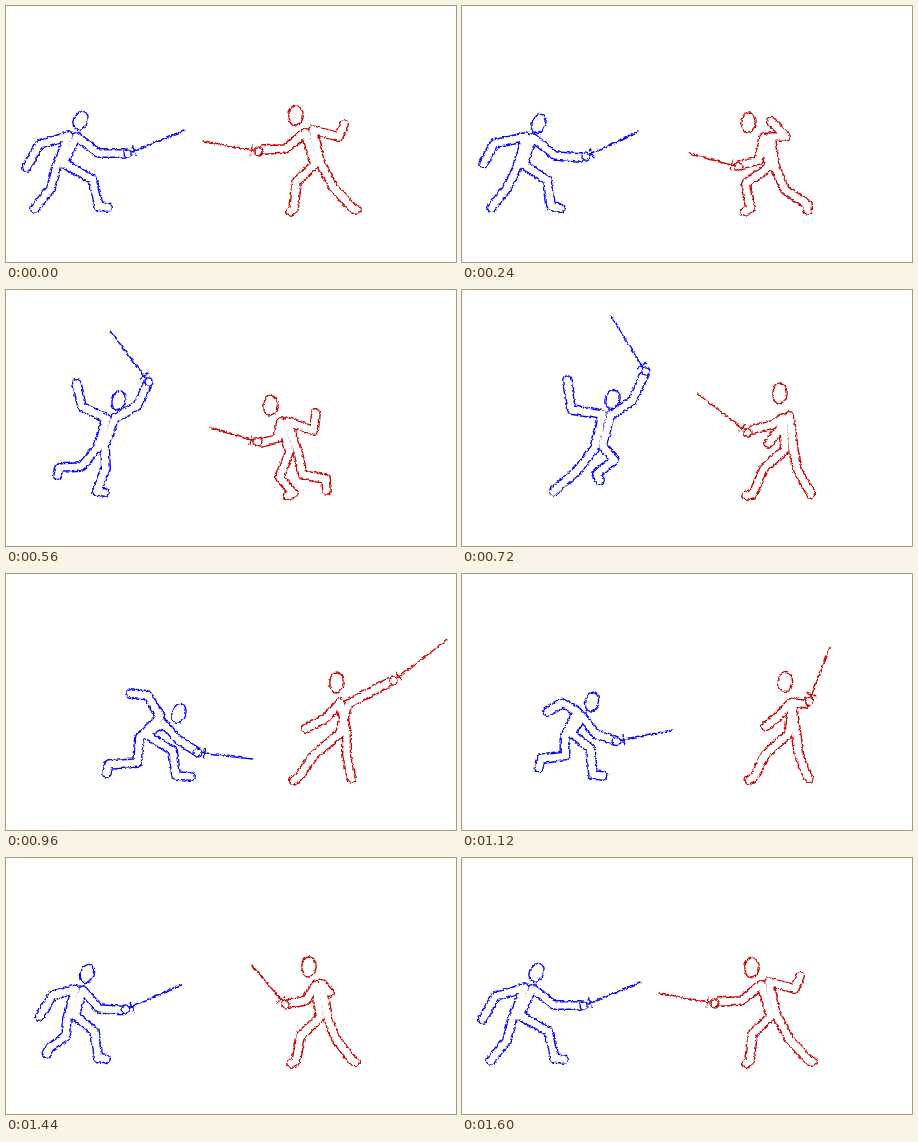
An HTML page without scripts that plays this animation: 450 by 256 pixels, repeating every 1680 ms.

```html
<!DOCTYPE html>
<html lang="en">
<head>
<meta charset="utf-8">
<title>Fencing duel</title>
<style>
html, body { margin: 0; width: 100%; height: 100%; overflow: hidden; background: #fff; }
svg { display: block; width: 100%; height: 100%; }
g { fill: none; stroke-width: 1.4; stroke-linecap: round; stroke-linejoin: round; }
marker { overflow: visible; fill: #fff; }
.blue { stroke: #0a0af0; }
.red { stroke: #c40808; }

/* A limb is a thick coloured stroke with a white one on top, leaving an outline. */
.limb { stroke-width: 10; }
.skin { stroke: #fff; stroke-width: 7.2; }
.limb, .blade { animation: 1680ms steps(4) infinite; }
.blue .lead { animation-name: blue-lead; }
.blue .rear { animation-name: blue-rear; }
.blue .blade { animation-name: blue-blade; }
.red .lead { animation-name: red-lead; }
.red .rear { animation-name: red-rear; }
.red .blade { animation-name: red-blade; }

/* Limbs run hand, elbow, shoulder, hip, knee, ankle, toe; steps() holds each in-between. */
@keyframes blue-lead {
  0%, 95.23%, to { d: path("M117 147L92 147 70 130 57 157 86 173 92 200 101 201"); animation-timing-function: steps(3); }
  14.28% { d: path("M118 151L92 149 70 131 61 158 85 174 88 199 98 202"); }
  33.33% { d: path("M140 95L131 115 108 128 98 156 99 178 90 201 98 202"); animation-timing-function: steps(2); }
  42.85% { d: path("M182 84L170 110 148 125 140 156 152 169 134 183 137 190"); animation-timing-function: steps(3); }
  57.14% { d: path("M189 176L171 165 157 149 139 160 166 176 169 201 184 202"); }
  76.19% { d: path("M115 156L93 153 82 133 79 157 90 173 91 199 97 200"); }
}
@keyframes blue-rear {
  0%, 95.23%, to { d: path("M20 161L33 138 62 129 50 160 44 182 30 200 28 202"); animation-timing-function: steps(3); }
  14.28% { d: path("M21 157L32 137 63 130 55 160 44 182 30 200 29 201"); }
  33.33% { d: path("M70 93L75 116 100 128 91 157 75 176 53 177 51 185"); animation-timing-function: steps(2); }
  42.85% { d: path("M105 90L109 119 140 124 132 158 115 180 94 198 91 201"); animation-timing-function: steps(3); }
  57.14% { d: path("M124 119L141 121 154 142 133 163 131 188 102 190 100 199"); }
  76.19% { d: path("M46 155L59 136 75 132 72 160 74 175 56 178 53 188"); }
}
@keyframes blue-blade {
  0%, 95.23%, to { d: path("M121 147L178 124M74 114z"); animation-timing-function: steps(3); }
  14.28% { d: path("M123 150L176 125M76 117z"); }
  33.33% { d: path("M142 91L104 41M112 110z"); animation-timing-function: steps(2); }
  42.85% { d: path("M183 81L148 25M150 109z"); animation-timing-function: steps(3); }
  57.14% { d: path("M191 178L246 184M172 139z"); }
  76.19% { d: path("M117 155L173 128M87 116z"); }
}
@keyframes red-lead {
  0%, 95.23%, to { d: path("M257 143L279 142 299 126 308 158 290 175 287 203 284 205"); animation-timing-function: steps(3); }
  14.28% { d: path("M277 159L296 154 301 131 307 160 283 177 288 202 282 205"); }
  33.33% { d: path("M254 152L271 148 274 131 283 161 273 187 287 203 281 205"); animation-timing-function: steps(2); }
  42.85% { d: path("M290 139L310 134 320 127 323 159 301 178 290 204 284 205"); animation-timing-function: steps(3); }
  57.14% { d: path("M382 108L365 117 342 129 333 159 306 182 292 203 287 206"); }
  76.19% { d: path("M307 147L319 142 319 127 319 160 299 178 291 203 286 205"); }
}
@keyframes red-rear {
  0%, 95.23%, to { d: path("M338 118L332 130 306 123 315 159 327 181 346 202 350 203"); animation-timing-function: steps(3); }
  14.28% { d: path("M309 115L323 130 308 130 313 162 323 184 345 198 345 204"); }
  33.33% { d: path("M309 122L307 140 281 131 291 161 296 184 319 188 320 200"); animation-timing-function: steps(2); }
  42.85% { d: path("M306 153L315 141 327 125 331 160 335 180 348 202 348 204"); animation-timing-function: steps(3); }
  57.14% { d: path("M299 154L319 144 333 128 340 158 340 180 344 201 345 204"); }
  76.19% { d: path("M307 150L314 138 325 127 327 160 333 181 345 202 348 204"); }
}
@keyframes red-blade {
  0%, 95.23%, to { d: path("M252 145L197 135M289 109z"); animation-timing-function: steps(3); }
  14.28% { d: path("M276 160L227 147M286 116z"); }
  33.33% { d: path("M251 151L203 137M264 115z"); animation-timing-function: steps(2); }
  42.85% { d: path("M285 142L235 103M317 103z"); animation-timing-function: steps(3); }
  57.14% { d: path("M387 106L441 65M330 108z"); }
  76.19% { d: path("M306 147L294 79M315 107z"); }
}
</style>
</head>
<body>
<svg viewBox="0 0 450 256" role="img" aria-label="Two sketched fencers duelling">
  <filter id="ink" filterUnits="userSpaceOnUse" x="0" y="0" width="450" height="256" color-interpolation-filters="sRGB">
    <feTurbulence baseFrequency=".2" numOctaves="2" seed="4"/>
    <feDisplacementMap in="SourceGraphic" scale="2" xChannelSelector="R" yChannelSelector="G"/>
  </filter>
  <g filter="url(#ink)">
    <g class="blue">
      <marker id="blue-hand" markerUnits="userSpaceOnUse" orient="auto"><circle r="4"/><path d="M7-5V5"/></marker>
      <marker id="blue-head" markerUnits="userSpaceOnUse" orient="18"><ellipse rx="6.8" ry="9.8"/></marker>
      <path class="limb rear"/>
      <path class="limb lead"/>
      <path class="limb skin rear"/>
      <path class="limb skin lead"/>
      <path class="blade" marker-start="url(#blue-hand)" marker-end="url(#blue-head)"/>
    </g>
    <g class="red">
      <marker id="red-hand" markerUnits="userSpaceOnUse" orient="auto"><circle r="4"/><path d="M7-5V5"/></marker>
      <marker id="red-head" markerUnits="userSpaceOnUse" orient="3"><ellipse rx="7.2" ry="10"/></marker>
      <path class="limb rear"/>
      <path class="limb lead"/>
      <path class="limb skin rear"/>
      <path class="limb skin lead"/>
      <path class="blade" marker-start="url(#red-hand)" marker-end="url(#red-head)"/>
    </g>
  </g>
</svg>
</body>
</html>
```
